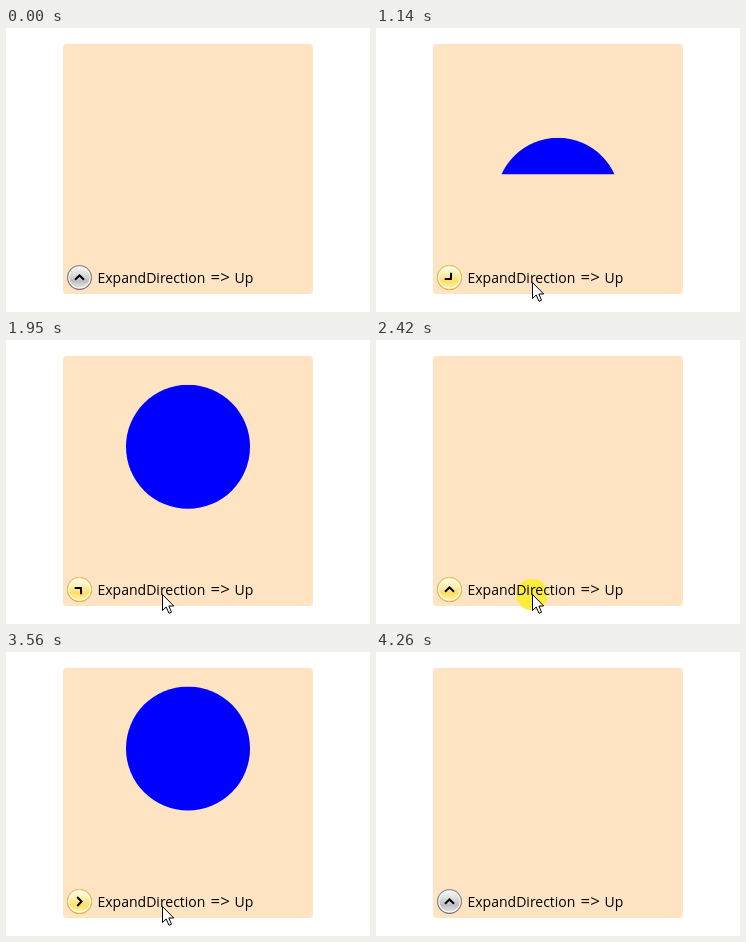
Recreate the animation shown at these times as an HTML page with a canvas. Size 364x284 px, loop 4.7 s.

```html
<!DOCTYPE html>
<html lang="en">
<head>
<meta charset="utf-8">
<title>Expander</title>
<style>
html, body { margin: 0; width: 100%; height: 100%; overflow: hidden; background: #fff; }
canvas { display: block; }
</style>
</head>
<body>
<canvas id="stage" width="364" height="284"></canvas>
<script>
const ctx = document.getElementById('stage').getContext('2d');
const LOOP = 4700;

// press: pointer goes down, start/end: expander moves
const clicks = [
  { press: 930, start: 990, end: 1340, open: true },
  { press: 1700, start: 1800, end: 2160, open: false },
  { press: 2420, start: 2500, end: 2850, open: true },
  { press: 3360, start: 3460, end: 3810, open: false }
];
const SPIN = 200;

const path = [
  [150, 200, 280], [220, 175, 271], [450, 175, 271],
  [610, 156, 254], [3910, 156, 254], [4120, 275, 287]
];

const gray = { rim: ['#8e8e8e', '#6c6c6c'], face: ['#f6f6f6', '#dedede', '#bdbdbd', '#e6e6e6'] };
const gold = { rim: ['#f6cf5c', '#f3bd30'], face: ['#fffbe6', '#fff0b4', '#ffdf62', '#fff3a8'] };

const ramp = (t, a, b) => Math.min(1, Math.max(0, (t - a) / (b - a)));
const mix = (a, b, k) => a + (b - a) * k;

function expander(t) {
  let reveal = 0, turn = 0;
  for (const c of clicks) {
    if (t < c.start) break;
    const k = Math.pow(ramp(t, c.start, c.end), c.open ? 2.07 : 1.85);
    const s = ramp(t, c.start, c.start + SPIN);
    reveal = c.open ? k : 1 - k;
    turn = c.open ? s : 1 - s;
  }
  return { reveal, turn };
}

function pointer(t) {
  if (t < path[0][0]) return null;
  for (let i = 1; i < path.length; i++) {
    const a = path[i - 1], b = path[i];
    if (t < b[0]) {
      const k = ramp(t, a[0], b[0]);
      return [Math.round(mix(a[1], b[1], k)), Math.round(mix(a[2], b[2], k))];
    }
  }
  return null;
}

function disc(x, y, r, fill) {
  ctx.fillStyle = fill;
  ctx.beginPath();
  ctx.arc(x, y, r, 0, Math.PI * 2);
  ctx.fill();
}

function shade(top, bottom, colors) {
  const g = ctx.createLinearGradient(0, top, 0, bottom);
  colors.forEach((c, i) => g.addColorStop(i / (colors.length - 1), c));
  return g;
}

function drawPanel() {
  ctx.fillStyle = '#ffe4c4';
  ctx.beginPath();
  ctx.roundRect(57, 16, 250, 250, 4);
  ctx.fill();
}

// The content box grows from its middle; the ball hangs from its top edge.
function drawBall(reveal) {
  if (reveal <= 0) return;
  const half = 104 * reveal, top = 128 - half;
  ctx.save();
  ctx.beginPath();
  ctx.rect(57, top, 250, half * 2);
  ctx.clip();
  disc(182, top + 62, 62, '#0000ff');
  ctx.restore();
}

function drawFace(skin, alpha) {
  if (alpha <= 0) return;
  ctx.globalAlpha = alpha;
  disc(73.5, 249.5, 12.5, shade(237, 262, skin.rim));
  disc(73.5, 249.5, 11.3, '#ffffff');
  disc(73.5, 249.5, 10.2, shade(239, 260, skin.face));
  ctx.globalAlpha = 1;
}

function drawButton(hover, turn) {
  drawFace(gray, 1);
  drawFace(gold, hover);
  ctx.save();
  ctx.translate(73.5, 249.5);
  ctx.rotate(Math.PI * turn);
  ctx.strokeStyle = '#000';
  ctx.lineWidth = 2;
  ctx.beginPath();
  ctx.moveTo(-4.5, 2.3);
  ctx.lineTo(0, -2);
  ctx.lineTo(4.5, 2.3);
  ctx.stroke();
  ctx.restore();
}

function label(text, x, size) {
  ctx.font = size + 'px "Open Sans", "Noto Sans", sans-serif';
  ctx.fillText(text, x, 255);
}

function drawHeader() {
  ctx.fillStyle = '#000';
  label('ExpandDirection', 91.5, 14);
  label('=>', 204.5, 17);
  label('Up', 228.5, 14);
}

function drawPointer([x, y]) {
  const shape = [[0, 0], [0, 16], [3.7, 12.5], [6.5, 18.8], [9, 17.7], [6.3, 11.5], [11.2, 11.5]];
  ctx.beginPath();
  for (const [dx, dy] of shape) ctx.lineTo(x + 0.5 + dx, y + 0.5 + dy);
  ctx.closePath();
  ctx.fillStyle = '#fff';
  ctx.fill();
  ctx.strokeStyle = '#000';
  ctx.lineWidth = 1;
  ctx.stroke();
}

function draw(t) {
  const { reveal, turn } = expander(t);
  const hover = ramp(t, 540, 720) * (1 - ramp(t, 4000, 4250));
  const tip = pointer(t);
  ctx.fillStyle = '#fff';
  ctx.fillRect(0, 0, 364, 284);
  drawPanel();
  drawBall(reveal);
  if (clicks.some(c => t >= c.press && t < c.start)) disc(156, 254.5, 15.8, '#feec3c');
  drawButton(hover, turn);
  drawHeader();
  if (tip) drawPointer(tip);
}

const began = performance.now();
function tick() {
  draw((performance.now() - began) % LOOP);
  requestAnimationFrame(tick);
}
tick();
</script>
</body>
</html>
```
